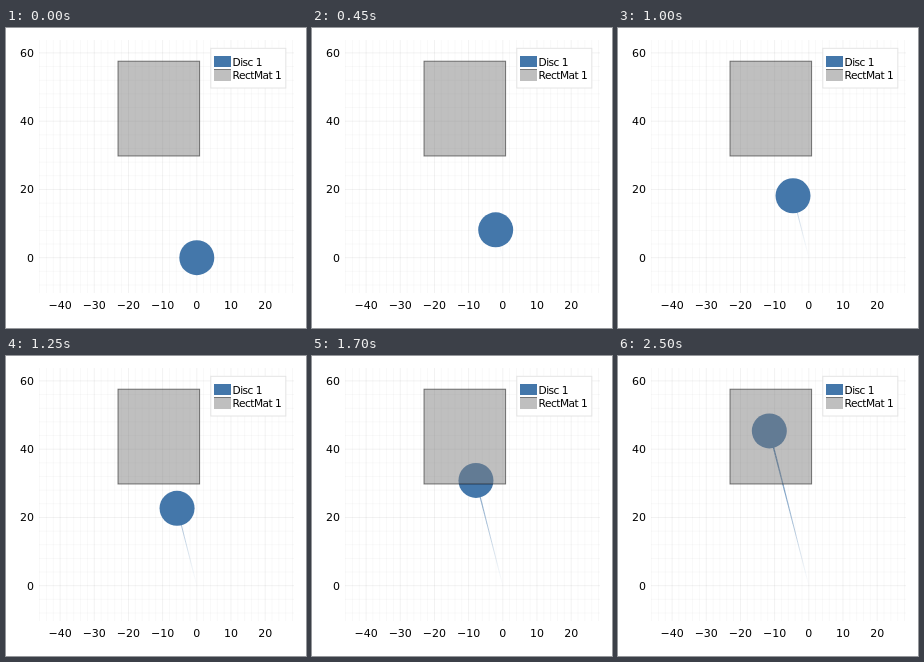
Write an HTML page with a canvas that moves like this. It is 300 by 300 pixels and loops after 2.55 s.

```html
<!DOCTYPE html>
<html>
<head>
<meta charset="utf-8">
<style>
html, body { margin: 0; width: 100%; height: 100%; overflow: hidden; background: #fff; }
canvas { display: block; }
</style>
</head>
<body>
<canvas id="stage" width="300" height="300"></canvas>
<script>
const ctx = document.getElementById('stage').getContext('2d');
const STEP = 50, COUNT = 51;
const BLUE = '#4477aa';
const plot = { left: 33, right: 288, top: 12, bottom: 265 };
const px = x => 190.8 + x * 3.418;
const py = y => 229.7 - y * 3.413;
const discAt = i => [px(-0.231 * i), py(0.907 * i)];

function line(x1, y1, x2, y2, color, width) {
  ctx.strokeStyle = color;
  ctx.lineWidth = width;
  ctx.beginPath();
  ctx.moveTo(x1, y1);
  ctx.lineTo(x2, y2);
  ctx.stroke();
}

function text(label, x, y, align, size) {
  ctx.font = `${size}px "DejaVu Sans", sans-serif`;
  ctx.textAlign = align;
  ctx.fillStyle = '#000';
  ctx.fillText(label, x, y);
}

function grid() {
  const shade = major => `rgba(0,0,0,${major ? 0.07 : 0.035})`;
  for (let x = -46; x <= 28; x += 2)
    line(px(x), plot.top, px(x), plot.bottom, shade(x % 10 === 0), 0.8);
  for (let y = -8; y <= 60; y += 4)
    line(plot.left, py(y), plot.right, py(y), shade(y % 20 === 0), 0.8);
  for (let x = -40; x <= 20; x += 10)
    text(String(x).replace('-', '\u2212'), px(x), 281, 'center', 11);
  for (let y = 0; y <= 60; y += 20)
    text(y, 28, py(y) + 4, 'right', 11);
}

// Opacity and width grow with distance from the launch point.
function trail(n) {
  for (let i = 1; i <= n; i++) {
    const k = i / (COUNT - 1);
    ctx.globalAlpha = Math.min(1, k * 1.1);
    line(...discAt(i - 1), ...discAt(i), BLUE, 0.6 + k);
  }
  ctx.globalAlpha = 1;
}

function disc(n) {
  ctx.fillStyle = BLUE;
  ctx.beginPath();
  ctx.arc(...discAt(n), 17.5, 0, Math.PI * 2);
  ctx.fill();
}

function mat() {
  ctx.fillStyle = 'rgba(128,128,128,0.5)';
  ctx.fillRect(112, 33.2, 81.6, 94.8);
  ctx.strokeStyle = 'rgba(0,0,0,0.5)';
  ctx.lineWidth = 1;
  ctx.strokeRect(112, 33.2, 81.6, 94.8);
}

function legend() {
  ctx.fillStyle = '#fff';
  ctx.fillRect(205, 20, 75, 40);
  ctx.strokeStyle = '#e4e4e4';
  ctx.lineWidth = 1;
  ctx.strokeRect(204.8, 20.3, 75, 39.7);
  ctx.fillStyle = BLUE;
  ctx.fillRect(208, 28, 17, 11);
  ctx.fillStyle = '#bfbfbf';
  ctx.fillRect(208, 41, 17, 12);
  line(208, 41.5, 225, 41.5, '#777', 1);
  ctx.letterSpacing = '-0.5px';
  text('Disc 1', 226.5, 37.6, 'left', 10.6);
  text('RectMat 1', 226.5, 51.2, 'left', 10.6);
  ctx.letterSpacing = '0px';
}

function draw(now) {
  const n = Math.floor(now / STEP) % COUNT;
  ctx.fillStyle = '#fff';
  ctx.fillRect(0, 0, 300, 300);
  grid();
  trail(n);
  disc(n);
  mat();
  legend();
}

const start = performance.now();
function tick() {
  draw(performance.now() - start);
  requestAnimationFrame(tick);
}
tick();
</script>
</body>
</html>
```
